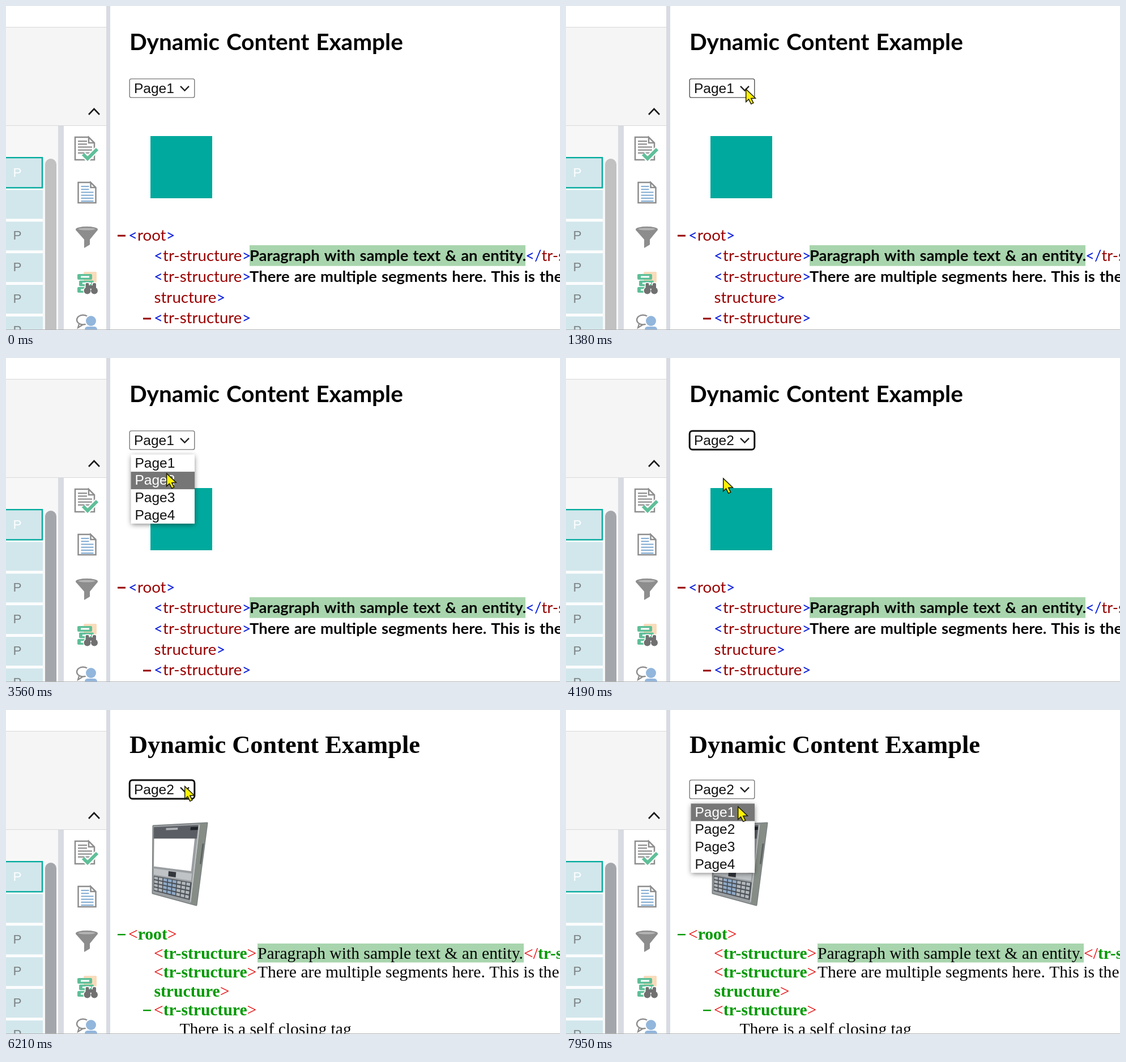
Write an HTML page with a canvas that moves like this. It is 978 px wide and 573 px high and loops after 8 s.

```html
<!DOCTYPE html>
<html lang="en">
<head>
<meta charset="utf-8">
<title>Dynamic Content Example</title>
<style>
html, body { margin: 0; width: 100%; height: 100%; overflow: hidden; background: #fff; }
canvas { display: block; width: 978px; height: 573px; }
</style>
</head>
<body>
<canvas id="stage" width="978" height="573"></canvas>
<script>
const ctx = document.getElementById('stage').getContext('2d');
const LOOP = 8000;
const TEAL = '#00a99d', GREY = '#8d8d8d', GREEN = '#5fbf98';
const SANS = '"Liberation Sans", Arial, sans-serif';
const SERIF = '"Liberation Serif", "Times New Roman", serif';
const LATO = 'Lato, sans-serif';
const UI_FONT = `24.5px ${SANS}`;

const PAGES = [
  {
    title: `bold 40.5px ${LATO}`, titleY: 77.5,
    tag: `27.6px ${LATO}`, bracket: `27.6px ${LATO}`, body: `bold 27.4px ${LATO}`, space: 0.05,
    bracketColor: '#0a1fe0', tagColor: '#990000',
    first: 414.7, line: 36.67, rise: 28.3, bodyX: 430, bodyEnd: 917,
    dash: 3, top: 128.5
  },
  {
    title: `bold 44.4px ${SERIF}`, titleY: 75.6,
    tag: `bold 29.6px ${SERIF}`, bracket: `29.6px ${SERIF}`, body: `29.6px ${SERIF}`, space: 0,
    bracketColor: '#e60000', tagColor: '#009900',
    first: 406, line: 33.5, rise: 26.5, bodyX: 444, bodyEnd: 914,
    dash: 2.4, top: 123.5
  }
];

// Each move goes on from where the last one ended
const MOVES = [
  { start: 280, end: 1050, steps: 12, via: [413, 389], to: [354, 169] },
  { start: 1120, end: 1380, steps: 5, to: [317, 146] },
  { start: 2800, end: 3250, steps: 7, to: [285, 200] },
  { start: 3560, end: 3860, steps: 5, to: [277, 212] },
  { start: 5520, end: 6210, steps: 11, to: [315, 134] },
  { start: 7350, end: 7580, steps: 4, to: [307, 164] },
  { start: 7820, end: 7950, steps: 2, to: [303, 170] }
];

const within = (t, a, b) => t >= a && t < b;
const lerp = (a, b, f) => a + (b - a) * f;
const mix = (p, q, f) => p.map((v, i) => lerp(v, q[i], f));
const easeOut = f => 1 - (1 - f) ** 1.375;

function pointerAt(t) {
  let from = [945, 585], pos = null;
  for (const { start, end, steps, to, via = mix(from, to, 0.5) } of MOVES) {
    if (t < start) break;
    const step = 1 + Math.floor((t - start) / (end - start) * (steps - 1) + 1e-6);
    const f = easeOut(Math.min(1, step / steps));
    pos = mix(mix(from, via, f), mix(via, to, f), f);
    from = to;
  }
  return pos;
}

function rect(x, y, w, h, fill) {
  ctx.fillStyle = fill;
  ctx.fillRect(x, y, w, h);
}

function poly(points, fill) {
  ctx.beginPath();
  points.forEach(p => ctx.lineTo(...p));
  ctx.closePath();
  ctx.fillStyle = fill;
  ctx.fill();
}

function stroke(points, color, width, close) {
  ctx.beginPath();
  points.forEach(p => ctx.lineTo(...p));
  if (close) ctx.closePath();
  ctx.strokeStyle = color;
  ctx.lineWidth = width;
  ctx.stroke();
}

function round(x, y, w, h, r, fill) {
  ctx.beginPath();
  ctx.roundRect(x, y, w, h, r);
  ctx.fillStyle = fill;
  ctx.fill();
}

function oval(x, y, rx, ry, fill) {
  ctx.beginPath();
  ctx.ellipse(x, y, rx, ry, 0, 0, 7);
  ctx.fillStyle = fill;
  ctx.fill();
}

// Draws text and returns the x where it ends
function text(str, x, y, font, color, space = 0) {
  ctx.font = font;
  ctx.wordSpacing = space * parseFloat(font.match(/[\d.]+px/)[0]) + 'px';
  ctx.fillStyle = color;
  ctx.fillText(str, x, y);
  return x + ctx.measureText(str).width;
}

function chevron(x, y, rx, ry, color, width) {
  stroke([[x - rx, y - ry], [x, y + ry], [x + rx, y - ry]], color, width);
}

function drawSheet(x, y, w, h, fold, lines, color) {
  const r = x + w;
  stroke([[r - fold, y], [x, y], [x, y + h], [r, y + h], [r, y + fold], [r - fold, y],
    [r - fold, y + fold], [r, y + fold]], GREY, 2.5);
  for (let i = 0; i < lines; i++) {
    rect(x + 5, y + 6 + i * 5.2, i < 2 ? w - fold - 8 : w - 9, 2.2, color);
  }
}

function drawIcons() {
  drawSheet(122, 232, 34, 40, 10, 5, GREY);
  for (const [color, width] of [['#fff', 10], [GREEN, 6]]) {
    stroke([[136, 262], [144, 270], [161, 253]], color, width);
  }
  drawSheet(127.5, 312, 31, 36, 9, 6, '#86aed4');

  // funnel
  poly([[123, 396], [162, 396], [148, 413], [148, 422], [138, 428], [138, 413]], GREY);
  oval(142.5, 395, 19.5, 5, GREY);
  oval(142.5, 394.5, 15, 2, '#b5b5b5');

  // books and binoculars
  round(137, 470, 23, 25, 2, '#f8dcbb');
  for (let i = 0; i < 3; i++) {
    round(126 + i % 2 * 3, 474 + i * 11.5, 26, 10, 2, GREEN);
    rect(132 + i % 2 * 3, 477.5 + i * 11.5, 15, 3, '#fff');
  }
  for (const [grow, color] of [[1.5, '#fff'], [0, '#707070']]) {
    for (const x of [143.5, 156]) {
      round(x - 3 - grow, 490 - grow, 6 + grow * 2, 12, 2, color);
      oval(x, 503.5, 6 + grow, 6 + grow, color);
    }
  }
  rect(146, 494, 7, 6, '#707070');

  // speech bubble and person
  oval(136, 555, 12.2, 9.7, GREY);
  stroke([[129, 562], [127, 569], [135, 564]], GREY, 2.2);
  oval(136, 555, 9.8, 7.3, '#fff');
  oval(150, 557, 11, 11, '#fff');
  oval(150, 557, 9, 9, '#92b6dc');
  round(139, 567, 22, 12, 5, '#92b6dc');
}

function drawPanel(t) {
  rect(0, 0, 978, 573, '#fff');
  rect(0, 37, 177, 174, '#f5f5f5');
  rect(0, 211, 92, 362, '#f7f7f7');
  for (const y of [37, 211]) rect(0, y, 177, 1, '#d8d8d8');
  rect(92, 212, 10, 361, '#d8dbe1');
  rect(177, 0, 7, 573, '#d8dbe1');
  chevron(155.5, 187, 9.5, -5, '#1c1c1c', 2.6);

  for (let i = 0; i < 6; i++) {
    const y = 269.5 + i * 55.9;
    rect(0, y - 2, 65, 55, '#fff');
    rect(0, y, 65, 51, '#d2e7ec');
    if (i !== 1) text('P', 12.5, y + 32, `22.5px ${SANS}`, i ? '#7d8385' : '#fff');
  }
  ctx.strokeStyle = TEAL;
  ctx.lineWidth = 2.4;
  ctx.strokeRect(-3, 268.2, 67, 53.2);
  round(69, 270, 20, 320, 10, t < 2460 ? '#c1c1c1' : '#a3a6ab');
  drawIcons();
}

function drawPhone() {
  const top = [[260, 205], [355, 200]], bottom = [[259, 324], [336, 345]];
  const at = (u, v) => mix(mix(...top, u), mix(...bottom, u), v);
  // Rectangle in body coordinates, 0 to 1 each way
  const part = (u, v, w, h, fill) =>
    poly([at(u, v), at(u + w, v), at(u + w, v + h), at(u, v + h)], fill);

  ctx.lineJoin = 'round';
  stroke([at(0, 0), at(1, 0), at(1, 1), at(0, 1)], '#777d7e', 3, true);
  part(0, 0, 1, 1, '#9a9ea1');
  part(0.87, 0, 0.13, 1, '#858d86');
  part(0.85, 0.02, 0.02, 0.96, '#c2c6c5');
  part(0.96, 0.25, 0.03, 0.25, '#5b615f');
  part(0.01, 0.02, 0.83, 0.17, '#5a5e64');
  part(0.24, 0.04, 0.22, 0.03, '#b0b4b8');
  part(0.7, 0.04, 0.14, 0.04, '#1f2227');
  part(0.02, 0.19, 0.78, 0.41, '#fff');
  part(0.02, 0.63, 0.8, 0.09, '#bfc3c6');
  part(0.33, 0.64, 0.16, 0.07, '#33363b');
  part(0.02, 0.74, 0.82, 0.22, '#4a5057');
  for (let i = 0; i < 32; i++) {
    const col = i % 8, row = i >> 3;
    part(0.03 + col * 0.1, 0.75 + row * 0.053, 0.08, 0.037, col > 1 && col < 5 ? '#8fa9c6' : '#b1b6ba');
  }
  ctx.lineJoin = 'miter';
}

function drawTag(p, x, row, open, name) {
  const y = p.first + row * p.line;
  x = text(open, x, y, p.bracket, p.bracketColor);
  x = text(name, x, y, p.tag, p.tagColor);
  text('>', x, y, p.bracket, p.bracketColor);
}

function drawContent(p, second) {
  text('Dynamic Content Example', 218, p.titleY, p.title, '#000', p.space);
  if (second) drawPhone();
  else rect(255, 230, 109, 110, TEAL);

  const y = row => p.first + row * p.line;
  const write = (str, x, row) => text(str, x, y(row), p.body, '#080808', p.space);
  rect(p.bodyX, y(1) - p.rise, p.bodyEnd - p.bodyX, p.line, '#a8d5ad');
  drawTag(p, 216, 0, '<', 'root');
  for (const row of [1, 2, 4]) drawTag(p, 261, row, '<', 'tr-structure');
  drawTag(p, 261.5, 3, '', 'structure');
  drawTag(p, p.bodyEnd, 1, '</', 'tr-structure');
  write('Paragraph with sample text & an entity.', p.bodyX, 1);
  write('There are multiple segments here. This is the', p.bodyX, 2);
  if (second) write('There is a self closing tag', 306.5, 5);
  rect(197, y(0) - 10, 14, p.dash, p.tagColor);
  rect(242, y(4) - 10, 14, p.dash, p.tagColor);
}

function drawSelect(y, label, focus, border) {
  round(218.2, y + 0.4, 114.6, 33, focus ? 5 : 3, '#fff');
  ctx.strokeStyle = focus ? '#101010' : border;
  ctx.lineWidth = focus ? 3 : 1.4;
  ctx.stroke();
  text(label, 226, y + 25.8, UI_FONT, '#111');
  chevron(315.5, y + 17.2, 7.5, 3.8, '#222', 2.4);
}

function drawList(y, active) {
  const row = 30.6;
  ctx.save();
  ctx.shadowColor = 'rgba(0,0,0,.5)';
  ctx.shadowBlur = 9;
  ctx.shadowOffsetY = 2;
  rect(220.5, y, 112.5, row * 4, '#fff');
  ctx.restore();
  rect(220.5, y + active * row, 112.5, row + 0.4, '#767676');
  for (let i = 0; i < 4; i++) {
    text('Page' + (i + 1), 227.5, y + 23.3 + i * row, UI_FONT, i === active ? '#fff' : '#111');
  }
}

function drawPointer([x, y], pressed) {
  if (pressed) oval(x, y - 0.5, 17, 17, 'rgba(255,250,50,.72)');
  const arrow = [[0.7, 1], [0.7, 23.5], [5.6, 19], [9.8, 27.3], [13.8, 25.3], [9.8, 17.4], [17.4, 17]]
    .map(([dx, dy]) => [x + dx, y + dy]);
  poly(arrow, '#fff200');
  stroke(arrow, '#1a1a00', 1.5, true);
}

function draw(t) {
  const second = t >= 4790, p = PAGES[+second];
  const open = within(t, 2460, 4190) || t >= 7000;
  const pressed = within(t, 1980, 2600) || within(t, 4040, 4190) || within(t, 6930, 7070);
  const focus = within(t, 4190, 7000);
  const hover = within(t, 1250, 1980) || within(t, 2600, 2900);
  const border = hover ? '#4f4f4f' : within(t, 1980, 2600) ? '#8d8d8d' : '#767676';

  drawPanel(t);
  drawContent(p, second);
  drawSelect(p.top, t < 4190 ? 'Page1' : 'Page2', focus, border);
  if (open) drawList(p.top + 42, within(t, 3560, 7820) ? 1 : 0);
  rect(0, 572, 978, 1, '#b4b4b4');
  const pointer = pointerAt(t);
  if (pointer) drawPointer(pointer, pressed);
}

const began = performance.now();
function frame() {
  draw((performance.now() - began) % LOOP);
  requestAnimationFrame(frame);
}
frame();
</script>
</body>
</html>
```
